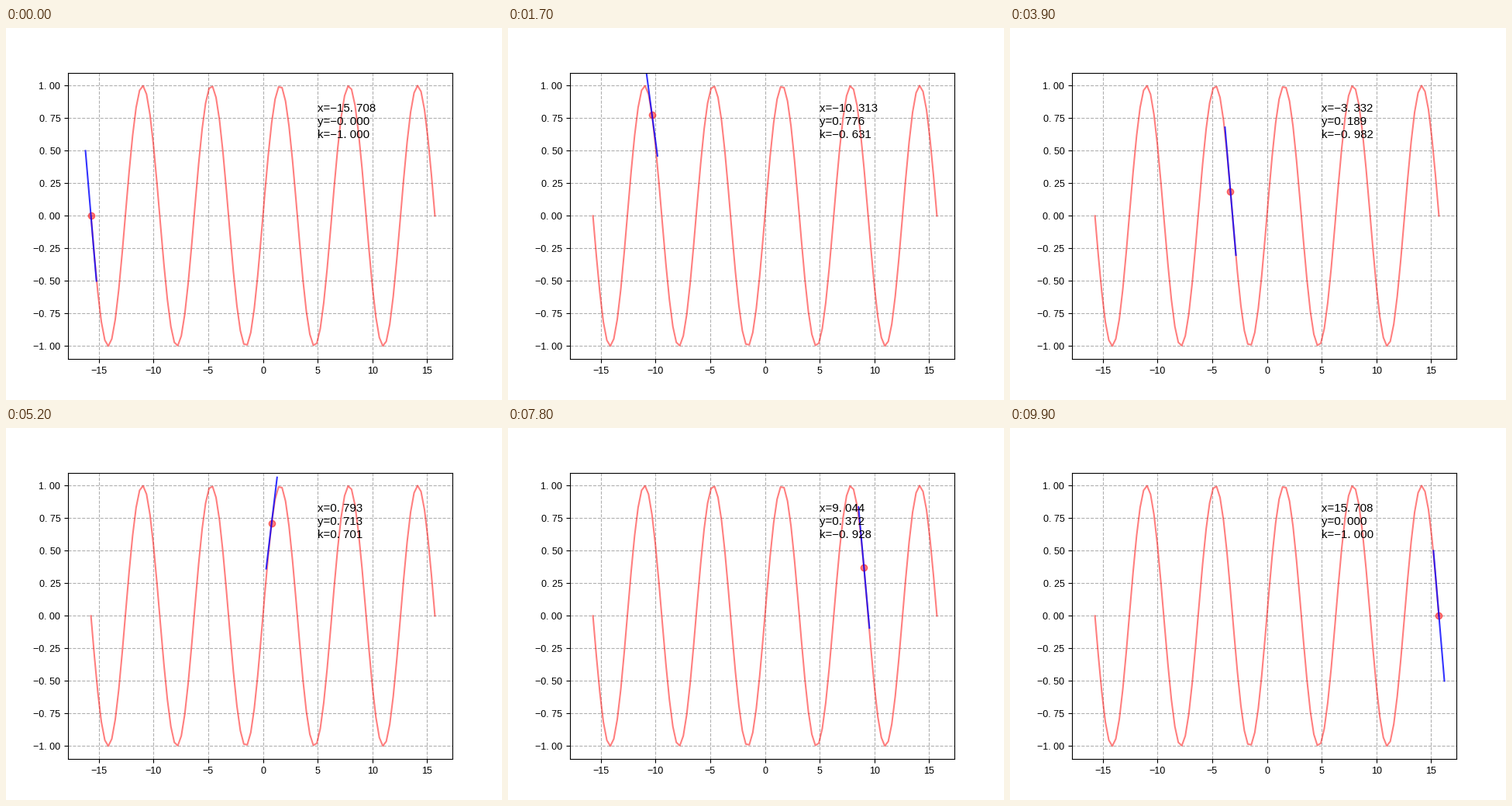
Recreate the animation shown at these times as a matplotlib script. Size 640x480 px, loop 10 s.

```python
import numpy as np
import matplotlib.pyplot as plt
from matplotlib.animation import FuncAnimation
from matplotlib.ticker import FuncFormatter

FRAMES = 100
HALF = 0.5  # half the tangent's span in x

plt.rcParams["font.family"] = "Liberation Sans"


def spaced(value, places):
    """Format a number with a true minus and a full-width decimal point."""
    return f"{value:.{places}f}".replace("-", "\u2212").replace(".", ". ")


def tangent(x):
    xs = np.array([x - HALF, x + HALF])
    return xs, np.sin(x) + np.cos(x) * (xs - x)


xs = np.linspace(-5 * np.pi, 5 * np.pi, FRAMES)

fig, ax = plt.subplots(figsize=(6.4, 4.8), dpi=100)
ax.grid(linestyle="--")
ax.plot(xs, np.sin(xs), color="red", alpha=0.5)
dot, = ax.plot(xs[:1], np.sin(xs[:1]), "ro", alpha=0.5)
line, = ax.plot(*tangent(xs[0]), color="blue", alpha=0.8)
labels = [ax.text(5, y, "", fontsize=10.8) for y in (0.8, 0.7, 0.6)]

# Keep the limits fitted to the opening pose.
ax.set_xlim(ax.get_xlim())
ax.set_ylim(ax.get_ylim())
ax.tick_params(labelsize=9)
ax.xaxis.set_major_formatter(FuncFormatter(lambda v, _: spaced(v, 0)))
ax.yaxis.set_major_formatter(FuncFormatter(lambda v, _: spaced(v, 2)))


def update(i):
    x = xs[i]
    y, k = np.sin(x), np.cos(x)
    dot.set_data([x], [y])
    line.set_data(*tangent(x))
    for label, name, value in zip(labels, "xyk", (x, y, k)):
        label.set_text(f"{name}={spaced(value, 3)}")
    return [dot, line, *labels]


anim = FuncAnimation(fig, update, frames=FRAMES, interval=100,
                     repeat=True, repeat_delay=0)
plt.show()
```
